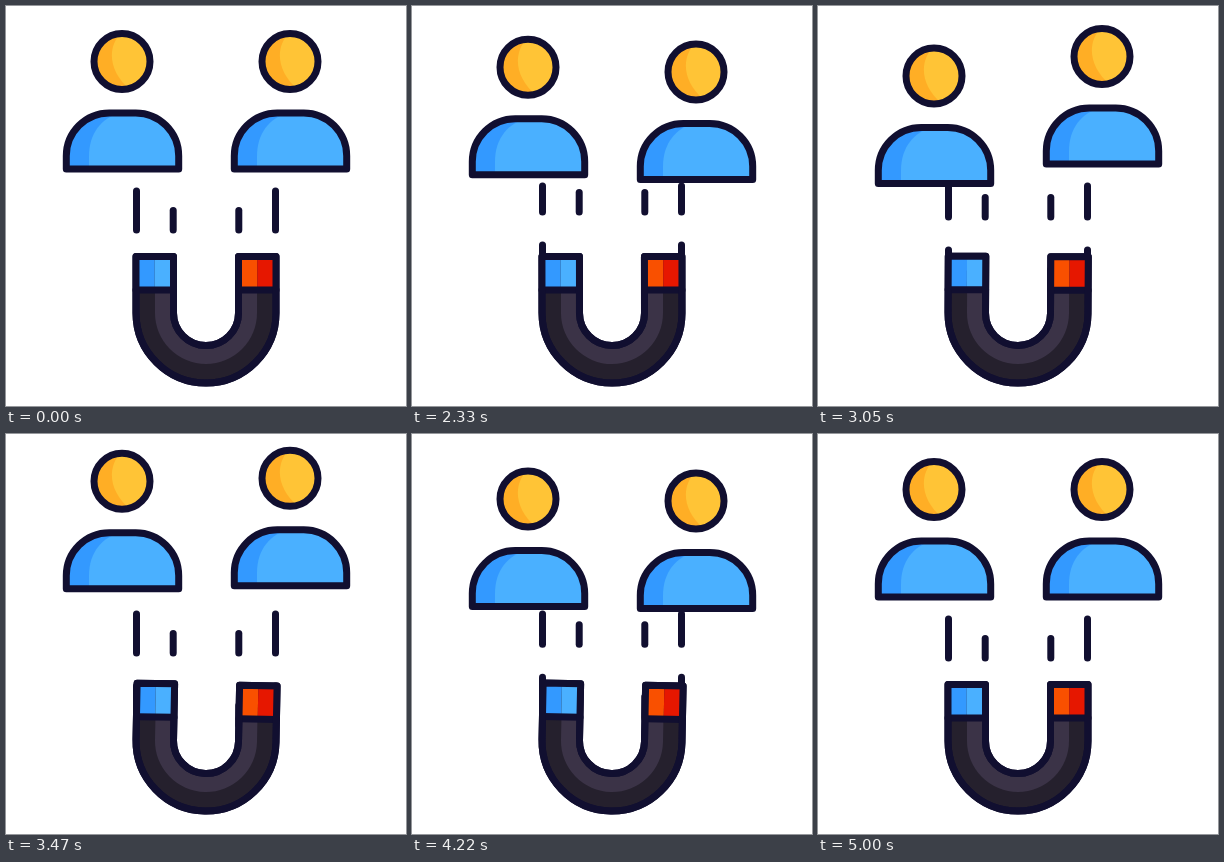
Write an HTML page with a canvas that moves like this. It is 400x400 px and loops after 5.03 s.

```html
<!DOCTYPE html>
<html lang="en">
<head>
<meta charset="utf-8">
<title>Magnet attracting people</title>
<style>
html, body { margin: 0; width: 100%; height: 100%; overflow: hidden; background: #fff; }
canvas { display: block; width: 100vmin; height: 100vmin; }
</style>
</head>
<body>
<canvas id="stage" width="400" height="400"></canvas>
<script>
const ctx = document.getElementById('stage').getContext('2d');
const { sin, cos, PI } = Math;
const LOOP = 5030, REST = 2000, ACTIVE = 3000, STEP = 30;
const NAVY = '#110f30', BLUE = '#3399ff', SKY = '#4ab0ff';

// Both people bob between the same heights, each with its own turning times.
const HEIGHTS = [0, 18, -14, 12, 0];
const LEFT = [0, .29, .567, .783, 1];
const RIGHT = [0, .2, .433, .7, 1];

function bob(turns, u) {
  const i = Math.max(1, turns.findIndex(v => u <= v));
  const k = (u - turns[i - 1]) / (turns[i] - turns[i - 1]);
  return HEIGHTS[i - 1] + (HEIGHTS[i] - HEIGHTS[i - 1]) * (1 - cos(PI * k)) / 2;
}

// Eight passes of the pull lines, slightly uneven in two waves.
const flow = u => 8 * u - .09 * sin(4 * PI * u) - .05 * (1 - cos(4 * PI * u));

// Magnet tilt in radians: 24 swings with the same two waves.
const tilt = u => -.02 * sin(2 * PI * (24 * u - .15 * sin(4 * PI * u)));

const head = new Path2D();
head.arc(116, 55.5, 28, 0, PI * 2);
const headLight = new Path2D('M116 26 C101 40 101 66 127 86 H150 V24 Z');
const body = new Path2D('M60.3 163 V150 A43 43 0 0 1 103.3 107 H129.7 A43 43 0 0 1 172.7 150 V163 Z');
const bodyLight = new Path2D('M83 163 V150 C83 126 97 110 118 106 H176 V166 H83 Z');
const magnet = new Path2D('M130 250.5 V307 A70 70 0 0 0 270 307 V250.5 H232.5 V307 A32.5 32.5 0 0 1 167.5 307 V250.5 Z');
const magnetLight = new Path2D('M149 284 V307 A51 51 0 0 0 251 307 V284 Z');

function rect(color, x, y, w, h) {
  ctx.fillStyle = color;
  ctx.fillRect(x, y, w, h);
}

function line(x0, y0, x1, y1) {
  ctx.beginPath();
  ctx.moveTo(x0, y0);
  ctx.lineTo(x1, y1);
  ctx.stroke();
}

// Base colour, lighter part on top, then the outline.
function shaded(shape, base, light, lightShape) {
  ctx.save();
  ctx.clip(shape);
  ctx.fillStyle = base;
  ctx.fill(shape);
  ctx.fillStyle = light;
  ctx.fill(lightShape);
  ctx.restore();
  ctx.stroke(shape);
}

function person(x, y) {
  ctx.save();
  ctx.translate(x, y);
  shaded(head, '#ffae25', '#ffc436', headLight);
  shaded(body, BLUE, SKY, bodyLight);
  ctx.restore();
}

function tip(x, dark, light) {
  rect(dark, x, 250, 18.75, 34);
  rect(light, x + 18.75, 250, 18.75, 34);
  line(x, 284, x + 37.5, 284);
}

function drawMagnet(angle) {
  ctx.save();
  ctx.translate(200, 307);
  ctx.rotate(angle);
  ctx.translate(-200, -307);
  shaded(magnet, '#25202d', '#3b3347', magnetLight);
  tip(130, BLUE, SKY);
  tip(232.5, '#f95000', '#e61700');
  ctx.stroke(magnet);
  ctx.restore();
}

// Lines grow out at the top edge and slide down behind the magnet.
function pull(shift) {
  const bottom = 224 + shift;
  for (const [gap, length] of [[69.5, 39], [32.8, 19.5]]) {
    const top = Math.max(bottom - length, 180);
    if (bottom <= top) continue;
    for (const x of [200 - gap, 200 + gap]) line(x, top, x, bottom);
  }
}

function draw(u) {
  rect('#fff', 0, 0, 400, 400);
  ctx.strokeStyle = NAVY;
  ctx.lineWidth = 7;
  ctx.lineCap = ctx.lineJoin = 'round';
  const shift = flow(u) % 1 * 72;
  pull(shift);
  pull(shift - 72);
  drawMagnet(tilt(u));
  person(0, bob(LEFT, u));
  person(168, bob(RIGHT, u));
}

function frame() {
  const t = performance.now() % LOOP;
  const elapsed = Math.floor((t - REST) / STEP) * STEP;
  // The last step equals the resting pose.
  draw(Math.max(0, elapsed) % ACTIVE / ACTIVE);
  requestAnimationFrame(frame);
}
frame();
</script>
</body>
</html>
```
